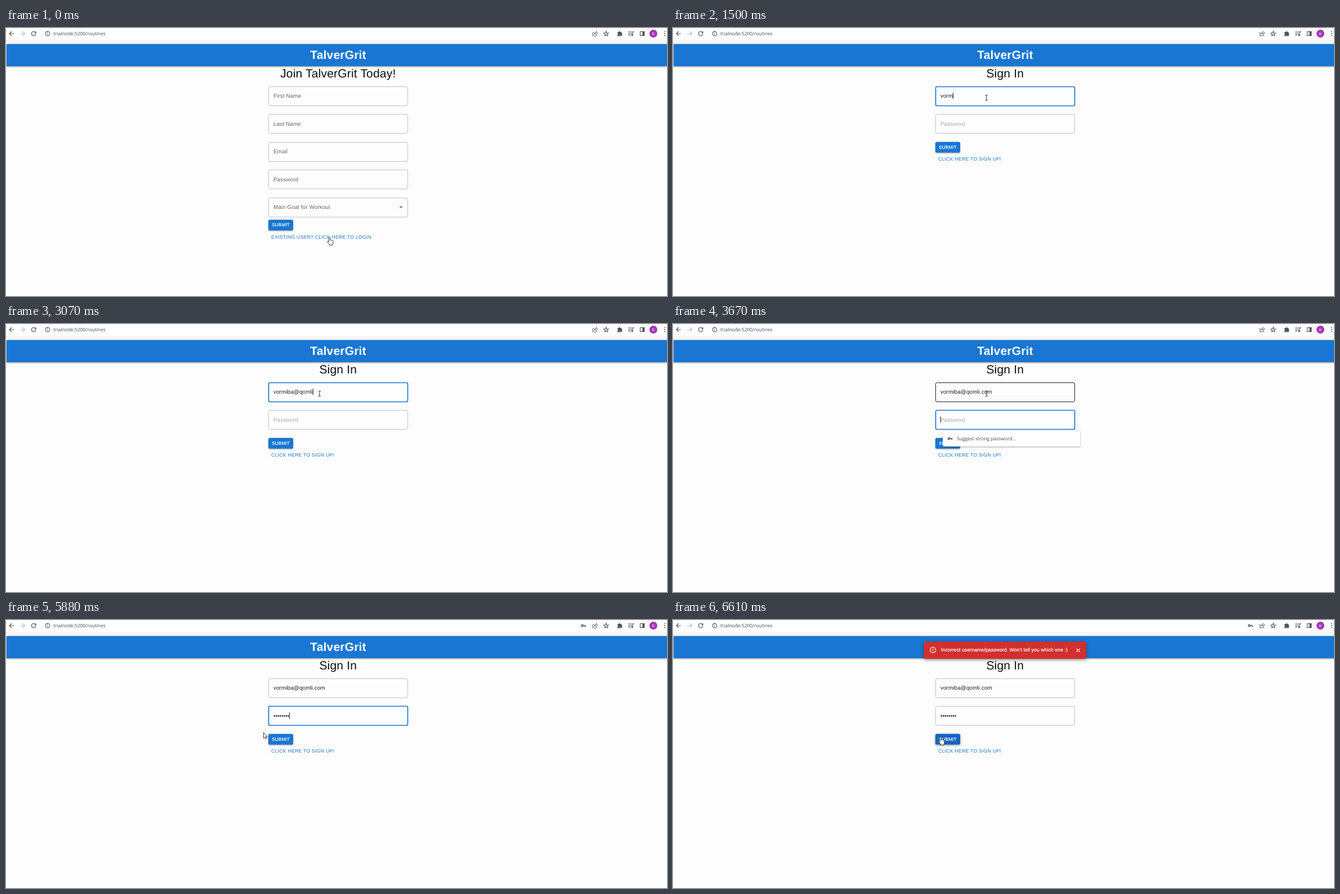
Write an HTML page that moves like this. It is 1174x477 px and loops after 8 s.

```html
<!DOCTYPE html>
<html lang="en">
<head>
<meta charset="utf-8">
<title>Sign in</title>
<style>
  html, body { margin: 0; width: 100%; height: 100%; overflow: hidden; background: #fdfdfd; }
  svg { display: block; width: 1174px; height: 477px; font-family: "Liberation Sans", Arial, sans-serif; text-rendering: geometricPrecision; }
  .ui { font-family: "Open Sans", "Noto Sans", sans-serif; }
  .url { font-size: 8.45px; fill: #45484c; }
  .line { fill: none; stroke: #505357; stroke-width: 1.1; }
  .solid { fill: #505357; }
  .title { font-size: 21.08px; font-weight: bold; letter-spacing: .155px; fill: #fff; }
  .head { font-size: 21.08px; letter-spacing: .155px; fill: #111; }
  .mid { text-anchor: middle; }
  .input { font-size: 9.92px; letter-spacing: .093px; fill: #212121; }
  .label { fill: #686868; }
  .hint { fill: #a9a9a9; }
  .box { fill: none; stroke: #c2c2c2; stroke-width: 1; }
  .box.hover { stroke: #212121; }
  .box.focus { stroke: #1976d2; stroke-width: 1.7; }
  .btn { fill: #1976d2; filter: drop-shadow(0 1px 1px rgba(0,0,0,.4)); }
  .btn.hover { fill: #1565c0; filter: drop-shadow(0 1.5px 2px rgba(0,0,0,.45)); }
  .btnText { font-size: 8.06px; letter-spacing: .23px; fill: #fff; stroke: #fff; stroke-width: .2px; }
  .link { font-size: 8.68px; letter-spacing: .248px; fill: #1976d2; }
  .bar { fill: #1976d2; filter: drop-shadow(0 1.5px 1.5px rgba(0,0,0,.4)); }
  .popup { fill: #fff; filter: drop-shadow(0 1px 1.5px rgba(0,0,0,.35)); }
  #toast { transform-box: fill-box; transform-origin: center; }
  .alert { fill: #d32f2f; filter: drop-shadow(0 2px 3px rgba(0,0,0,.4)); }
  .alertText { font-size: 8.68px; letter-spacing: .093px; fill: #fff; stroke: #fff; stroke-width: .22px; }
  .white { fill: none; stroke: #fff; stroke-width: 1.1; }
  .skin { fill: #fff; stroke: #222; stroke-width: .9; stroke-linejoin: round; }
</style>
</head>
<body>
<svg viewBox="0 0 1174 477">
  <defs>
    <g id="keyShape">
      <circle cx="-2" cy="0" r="1.7" fill="none" stroke="#505357" stroke-width="1.5"/>
      <path d="M0 0H4.5M3.2 0V2.2" fill="none" stroke="#505357" stroke-width="1.5"/>
    </g>
  </defs>

  <!-- Browser bar -->
  <rect width="1174" height="23" fill="#fff"/>
  <rect y="22.5" width="1174" height="1" fill="#e6e7e8"/>
  <path class="line" d="M14 10H6.2M10 6L6 10L10 14"/>
  <path class="line" style="stroke:#b9bbbe" d="M25 10H33M29.5 6L33.5 10L29.5 14"/>
  <path class="line" d="M52.2 7.2A4 4 0 1 0 53.2 11"/>
  <path class="solid" d="M53.6 5.6V9.4H49.8Z"/>
  <circle class="line" cx="74" cy="10" r="3.9" stroke-width="1"/>
  <path class="line" d="M74 9.4V12.2M74 7.6V8.6"/>
  <text class="ui url" x="84" y="13">trialnode:5200/routines</text>
  <use id="key" href="#keyShape" x="1025.5" y="10"/>
  <path class="line" d="M1044 8H1042V14H1049V12M1043.8 11.6Q1044.5 8 1048 8V6L1051 9L1048 11.6V9.8Q1045.5 9.6 1043.8 11.6Z" style="stroke-width:.9"/>
  <path class="line" d="M1066 5.8L1067.2 8.7L1070.3 8.9L1067.9 10.9L1068.7 13.9L1066 12.2L1063.3 13.9L1064.1 10.9L1061.7 8.9L1064.8 8.7Z"/>
  <path class="solid" d="M1086 7.2H1088.3A1.5 1.5 0 0 1 1091.3 7.2H1093.5V9.5A1.5 1.5 0 0 1 1093.5 12.4V14.4H1091.2A1.5 1.5 0 0 0 1088.4 14.4H1086V12.2A1.5 1.5 0 0 0 1086 9.4Z"/>
  <path class="line" d="M1105 7H1112M1105 9.7H1112M1105 12.4H1109M1113.2 12.5V6.6H1115.5"/>
  <circle class="solid" cx="1112" cy="12.6" r="1.6"/>
  <rect class="line" x="1126.4" y="6.4" width="7.4" height="7.2"/>
  <rect class="solid" x="1130.4" y="6.4" width="3.6" height="7.2"/>
  <circle cx="1149.8" cy="10" r="7" fill="#a436b4"/>
  <text class="ui mid" x="1149.8" y="12.7" font-size="7.4" fill="#fff">K</text>
  <g class="solid"><circle cx="1170" cy="6.6" r="1"/><circle cx="1170" cy="10" r="1"/><circle cx="1170" cy="13.4" r="1"/></g>

  <rect class="bar" x="1" y="28.5" width="1180" height="39.5"/>
  <text class="title mid" x="590" y="55">TalverGrit</text>

  <g id="join">
    <text class="head mid" x="589.8" y="88">Join TalverGrit Today!</text>
    <path fill="#707070" d="M698.3 317.4H705L701.6 320.8Z"/>
  </g>

  <g id="sign">
    <text class="head mid" x="589.8" y="88">Sign In</text>
    <rect id="caret" width=".9" height="11.4" fill="#111"/>
  </g>

  <g id="popup">
    <rect class="popup" x="479" y="190" width="244" height="28" rx="2.5"/>
    <use href="#keyShape" x="492" y="204"/>
    <text class="ui url" x="504" y="207">Suggest strong password…</text>
  </g>

  <g id="toast">
    <rect class="alert" x="445.5" y="38.5" width="288.5" height="30.5" rx="2.5"/>
    <circle class="white" cx="461.8" cy="53.4" r="5"/>
    <path class="white" d="M461.8 50.6V54.2M461.8 55V56.3"/>
    <text class="alertText" x="476" y="56.3">Incorrect username/password. Won't tell you which one :)</text>
    <path class="white" d="M716.6 50.8L722.8 57M722.8 50.8L716.6 57"/>
  </g>

  <g id="cursor">
    <path id="arrow" class="skin" d="M.4 .4V10.2L2.6 8.2L4.2 11.7L5.9 11L4.3 7.6H7.1Z"/>
    <path id="beam" fill="none" stroke="#333" stroke-width="1" d="M-2.3 -4.6H-.6L0 -4.1L.6 -4.6H2.3M0 -4.1V4.1M-2.3 4.6H-.6L0 4.1L.6 4.6H2.3"/>
    <path id="hand" class="skin" d="M-1.2 8.6V1.4Q-1.2 .3 0 .3T1.2 1.4V5.6Q2.2 4.6 3.2 5.8Q4.3 5 5 6.2Q6.4 5.8 6.5 7.2V10.4Q6.4 12 5.4 13V14.4H-.2V13.2L-3.6 8.9Q-4 7.4 -2.7 7.2Z"/>
  </g>
</svg>
<script>
const LOOP = 8000, ROW = 49.4;
const EMAIL = 'vormiba@qomli.com';
const $ = id => document.getElementById(id);

function add(parent, tag, attrs, text = '') {
  const el = document.createElementNS('http://www.w3.org/2000/svg', tag);
  for (const name in attrs) el.setAttribute(name, attrs[name]);
  el.textContent = text;
  return parent.appendChild(el);
}

function addField(page, row, label, style) {
  const box = add(page, 'rect', { class: 'box', x: 466.5, y: Math.round(104 + ROW * row) + .5, width: 247, height: 34, rx: 2.5 });
  const text = add(page, 'text', { class: 'input ' + style, x: 474.9, y: 124.3 + ROW * row }, label);
  return { box, text, label };
}

function addButtons(page, y, link) {
  const btn = add(page, 'rect', { class: 'btn', x: 466, y, width: 44, height: 19, rx: 2.5 });
  add(page, 'text', { class: 'btnText', x: 472.2, y: y + 11.8 }, 'SUBMIT');
  add(page, 'text', { class: 'link', x: 471, y: y + 33.3 }, link);
  return btn;
}

['First Name', 'Last Name', 'Email', 'Password', 'Main Goal for Workout']
  .forEach((label, row) => addField($('join'), row, label, 'label'));
addButtons($('join'), 341.3, 'EXISTING USER? CLICK HERE TO LOGIN');

const fields = ['Email', 'Password'].map((label, row) => addField($('sign'), row, label, 'hint'));
const submit = addButtons($('sign'), 202.8, 'CLICK HERE TO SIGN UP!');
$('sign').append($('caret'));

// Each track lists [start time, value...]; a value holds until the next entry.
const emailLength = [[0, 0], [1070, 1], [1210, 2], [1360, 3], [1500, 4], [1930, 6], [2080, 7],
  [2360, 8], [2500, 9], [2650, 10], [2790, 12], [3070, 13], [3220, 14], [3370, 16], [3520, 17]];
const dotCount = [[0, 0], [4080, 1], [4230, 2], [4530, 3], [4830, 4], [5130, 5], [5280, 6], [5580, 7], [5880, 8]];
const focusRow = [[0, -1], [610, 0], [3670, 1], [6320, -1]];
const hoverRow = [[0, -1], [460, 0], [4830, -1], [4980, 1], [5280, -1]];
const pointer = [[0, 'hand', 574.5, 372], [160, 'arrow', 574, 372], [310, 'arrow', 563, 205],
  [460, 'beam', 556.8, 124], [4680, 'beam', 552, 125], [4830, 'arrow', 527, 141],
  [4980, 'beam', 494, 166], [5130, 'beam', 472, 179], [5280, 'arrow', 455, 183],
  [5430, 'arrow', 450, 184], [5580, 'arrow', 449.5, 186], [5880, 'arrow', 457, 200],
  [6030, 'arrow', 463, 203], [6170, 'hand', 475, 207.5], [6320, 'hand', 475.5, 208]];
const toastShow = [[0, 0, 1, 1], [6460, .75, .94, .88], [6610, 1, 1, 1]];

const at = (track, t) => track.findLast(key => key[0] <= t).slice(1);
const show = (el, on) => { el.style.display = on ? '' : 'none'; };

function drawField(row, value, focus, hover) {
  const { box, text, label } = fields[row];
  box.setAttribute('class', 'box' + (focus ? ' focus' : hover ? ' hover' : ''));
  text.setAttribute('class', 'input' + (value ? '' : ' hint'));
  text.textContent = value || label;
  if (!focus) return;
  $('caret').setAttribute('x', 474.7 + (value ? text.getComputedTextLength() : 0));
  $('caret').setAttribute('y', 115 + ROW * row);
}

function draw(t) {
  const [focus] = at(focusRow, t), [hover] = at(hoverRow, t);
  show($('join'), t < 160);
  show($('sign'), t >= 160);
  show($('caret'), focus >= 0);
  show($('key'), t >= 4080);
  show($('popup'), t >= 3670 && t < 4080);

  const values = [EMAIL.slice(0, at(emailLength, t)[0]), '•'.repeat(at(dotCount, t)[0])];
  values.forEach((value, row) => drawField(row, value, focus === row, hover === row));
  submit.setAttribute('class', t >= 6170 ? 'btn hover' : 'btn');

  const [opacity, sx, sy] = at(toastShow, t);
  show($('toast'), opacity > 0);
  $('toast').style.opacity = opacity;
  $('toast').style.transform = `scale(${sx}, ${sy})`;

  const [kind, x, y] = at(pointer, t);
  ['arrow', 'beam', 'hand'].forEach(id => show($(id), id === kind));
  $('cursor').setAttribute('transform', `translate(${x} ${y})`);
}

function tick() {
  draw(performance.now() % LOOP);
  requestAnimationFrame(tick);
}
tick();
</script>
</body>
</html>
```
